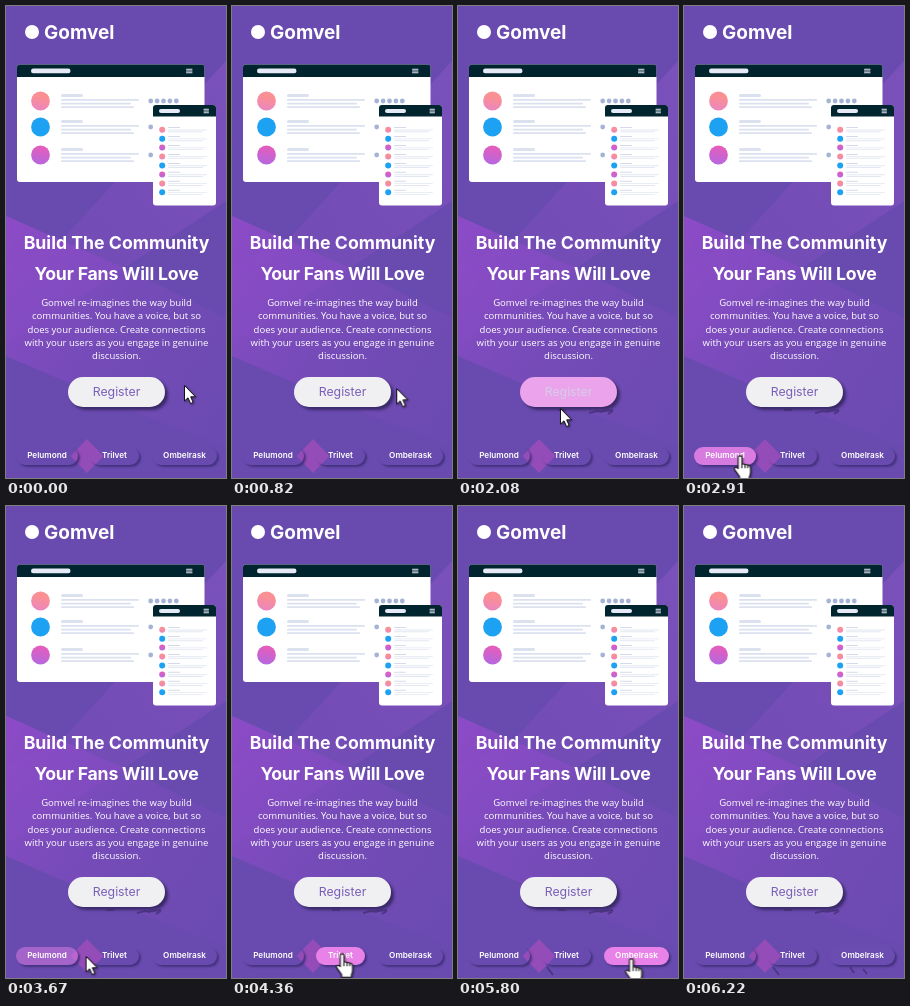
Write an HTML page that moves like this. It is 220 px wide and 472 px high and loops after 6290 ms.

```html
<!DOCTYPE html>
<html lang="en">
<head>
<meta charset="utf-8">
<title>Landing page</title>
<style>
  html, body { margin: 0; width: 100%; height: 100%; overflow: hidden; background: #694baf; }
  #stage { position: relative; width: 220px; height: 472px; overflow: hidden; font-family: Inter, sans-serif; }
  svg { position: absolute; left: 0; top: 0; }
  .pill {
    position: absolute; box-sizing: border-box; border-radius: 20px; text-align: center;
    color: #fff; white-space: nowrap;
  }
  #register {
    left: 62px; top: 371px; width: 97px; height: 30px; line-height: 30px; font-size: 12.3px;
    background: #f0f0f2; color: #7a5fb8; box-shadow: 3px 3px 3px #2f2258d0;
  }
  .social {
    top: 441px; height: 18px; line-height: 17px; font-size: 8.2px; font-weight: 600;
    box-shadow: 2px 2px 2px #3d2c74cc;
  }
  .head { font-weight: 700; fill: #fff; }
  .copy { font: 500 9.55px "Open Sans", sans-serif; fill: #fff; }
</style>
</head>
<body>
<div id="stage">
  <svg width="220" height="472" viewBox="0 0 220 472">
    <defs>
      <linearGradient id="glow" x1="0" y1=".1" x2="1" y2=".8">
        <stop stop-color="#9a4bd0" stop-opacity=".7"/>
        <stop offset=".5" stop-color="#8a4bc8" stop-opacity=".38"/>
        <stop offset="1" stop-color="#804bc0" stop-opacity=".12"/>
      </linearGradient>
      <linearGradient id="band" x1="0" y1="1" x2="1" y2="0">
        <stop stop-color="#9a4bd0" stop-opacity=".1"/>
        <stop offset="1" stop-color="#8a58c4" stop-opacity=".5"/>
      </linearGradient>
      <linearGradient id="coral" x1=".6" x2=".4" y2="1">
        <stop offset=".3" stop-color="#fa8f94"/><stop offset="1" stop-color="#ea86c0"/>
      </linearGradient>
      <linearGradient id="orchid" x1=".6" x2=".4" y2="1">
        <stop stop-color="#e85cb8"/><stop offset="1" stop-color="#b468e0"/>
      </linearGradient>
    </defs>
    <rect width="220" height="472" fill="#694baf"/>
    <path d="M220 55V195L118 262 0 340V260L55 235Z" fill="url(#band)"/>
    <path d="M0 210 118 262 220 312V440L135 408 0 350Z" fill="url(#glow)"/>
    <path d="M81 433 97.500 450 81 467 64.500 450Z" fill="#944cb8"/>

    <circle cx="26" cy="26" r="7" fill="#fff"/>
    <text class="head" x="38" y="33" font-size="19">Gomvel</text>
    <g id="mockup"></g>

    <g text-anchor="middle">
      <g class="head" font-size="17.7">
        <text x="110.500" y="243.300">Build The Community</text>
        <text x="110.500" y="274.300" letter-spacing="-.2">Your Fans Will Love</text>
      </g>
      <g class="copy">
        <text x="110.500" y="300">Gomvel re-imagines the way build</text>
        <text x="110.500" y="313.400">communities. You have a voice, but so</text>
        <text x="110.500" y="326.800">does your audience. Create connections</text>
        <text x="110.500" y="340">with your users as you engage in genuine</text>
        <text x="110.500" y="353.400">discussion.</text>
      </g>
    </g>
  </svg>

  <div class="pill" id="register">Register</div>
  <div class="pill social" id="first" style="left:10px;width:62px">Pelumond</div>
  <div class="pill social" id="second" style="left:84px;width:49px">Trilvet</div>
  <div class="pill social" id="third" style="left:146px;width:65px">Ombelrask</div>

  <svg width="220" height="472" viewBox="0 0 220 472">
    <g fill="none" stroke="#3b2c6c" stroke-width="2" opacity=".65">
      <path id="trailA" d="M100 404h8M131 407l8-2 6 1M141 405.500l14-1.500M150 408l5-3"/>
      <path id="trailB" d="M89 461l6 8"/>
      <path id="trailC" d="M166 461l4 6M179 463l4 5"/>
    </g>
    <g id="cursor" fill="#fff" stroke="#111" stroke-linejoin="round"
       style="filter:drop-shadow(1px 1px 1px #0006)">
      <path id="arrow" d="M.5.500V16l3.500-3.200 2.600 5.800 2.600-1.200-2.500-5.600h4.800Z"/>
      <path id="hand" transform="scale(1.1)" d="M-1.700 11V1.500a1.700 1.700 0 0 1 3.400 0V7l5.800 1.400q2 .6 2 2.600v4q0 2-1 3.500V21H-.5v-2.500L-4.500 13q-1.500-2 .3-2.700 1.200-.4 2.500 1.200ZM1.700 7v4M4.500 7.700V11M7 8.400V11"/>
    </g>
  </svg>
</div>
<script>
const LOOP = 6290, FADE = 390;
const PINK = '#e882e8', CLEAR = 'rgba(232,130,232,0)';
const $ = id => document.getElementById(id);

// Hero illustration
const bar = (x, y, w, h, fill) =>
  `<rect x="${x}" y="${y}" width="${w}" height="${h}" rx="${h / 2}" fill="${fill}"/>`;
const dot = (x, y, r, fill) => `<circle cx="${x}" cy="${y}" r="${r}" fill="${fill}"/>`;
const tints = ['url(#coral)', '#1da1f2', 'url(#orchid)'];

function panel(x, y, w, h, head) {
  return `<rect x="${x}" y="${y}" width="${w}" height="${h}" rx="3" fill="#fff"/>
    <path d="M${x} ${y + head}v${3 - head}q0-3 3-3h${w - 6}q3 0 3 3v${head - 3}Z" fill="#00252e"/>`;
}
function menu(x, y, w) {
  return [0, 1.7, 3.4].map(d => bar(x, y + d, w, 1, '#dfe4f0')).join('');
}

let art = panel(11, 58.5, 187.5, 117.5, 12.5) + bar(25, 62.6, 39.5, 4.6, '#e6e9f6') + menu(180, 62.8, 6.5);
[95, 121, 149].forEach((y, i) => {
  art += dot(34.5, y, 9.4, tints[i]) + bar(55, y - 7, 22, 3, '#dbe1ee');
  [78, 72, 77].forEach((w, k) => art += bar(55, y - 1.9 + k * 3.6, w - k * 2, 1.7, '#dbe1ee'));
  for (let k = 0; k < 5; k++) art += dot(144.7 + k * 6.4, y, 2.4, '#a5b4d6');
});
art += panel(147, 99, 63, 100.5, 11.5) + bar(153, 103, 21, 4, '#e6e9f6') + menu(197.5, 102.8, 5.5);
for (let i = 0; i < 8; i++) {
  const y = 123.7 + i * 8.95;
  art += dot(156.2, y, 3, tints[i % 3]) + bar(162, y - 2.6, 12, 1, '#d3daea')
    + bar(162, y - .2, 39, .9, '#e3e7f1') + bar(162, y + 1.6, 35, .9, '#e3e7f1');
}
$('mockup').innerHTML = art;

// steps: [ms, value] pairs; the first and last values fill out the loop
function play(id, prop, steps, easing = 'linear') {
  const all = [[0, steps[0][1]], ...steps, [LOOP, steps[steps.length - 1][1]]];
  $(id).animate(all.map(([ms, value]) => ({ offset: ms / LOOP, [prop]: value, easing })),
    { duration: LOOP, iterations: Infinity });
}
function hover(id, prop, from, to, enter, leave) {
  play(id, prop, [[enter, from], [enter + FADE, to], [leave, to], [leave + FADE, from]], 'ease');
}
function show(id, ...toggles) {
  let on = 0;
  play(id, 'opacity', toggles.flatMap(ms => [[ms, on], [ms, on = 1 - on]]));
}

const path = [
  [330, 178, 379], [970, 160, 383], [1040, 157, 384], [1320, 135, 390], [1660, 134, 390],
  [2080, 102, 402], [2290, 97, 407], [2680, 67, 441], [2910, 56, 450], [3190, 58, 450],
  [3390, 58, 450], [3950, 101, 450], [4360, 110, 448], [4645, 133, 448], [4800, 148, 448],
  [4860, 160, 448], [5140, 172, 450], [5760, 172, 450], [5890, 176, 459], [6020, 181, 478]
];
play('cursor', 'transform', path.map(([ms, x, y]) => [ms, `translate(${x}px,${y}px)`]));

hover('register', 'backgroundColor', '#f0f0f2', PINK, 1040, 2000);
hover('register', 'color', '#7a5fb8', '#fff', 1040, 2000);
hover('first', 'backgroundColor', CLEAR, PINK, 2680, 3550);
hover('second', 'backgroundColor', CLEAR, PINK, 3730, 4645);
hover('third', 'backgroundColor', CLEAR, PINK, 4800, 5890);

const handTimes = [2680, 3550, 3730, 4645, 4800, 5890];
show('hand', ...handTimes);
play('arrow', 'opacity', handTimes.flatMap((ms, i) => [[ms, 1 - i % 2], [ms, i % 2]]));
show('trailA', 1800);
show('trailB', 4650);
show('trailC', 5950);
</script>
</body>
</html>
```
